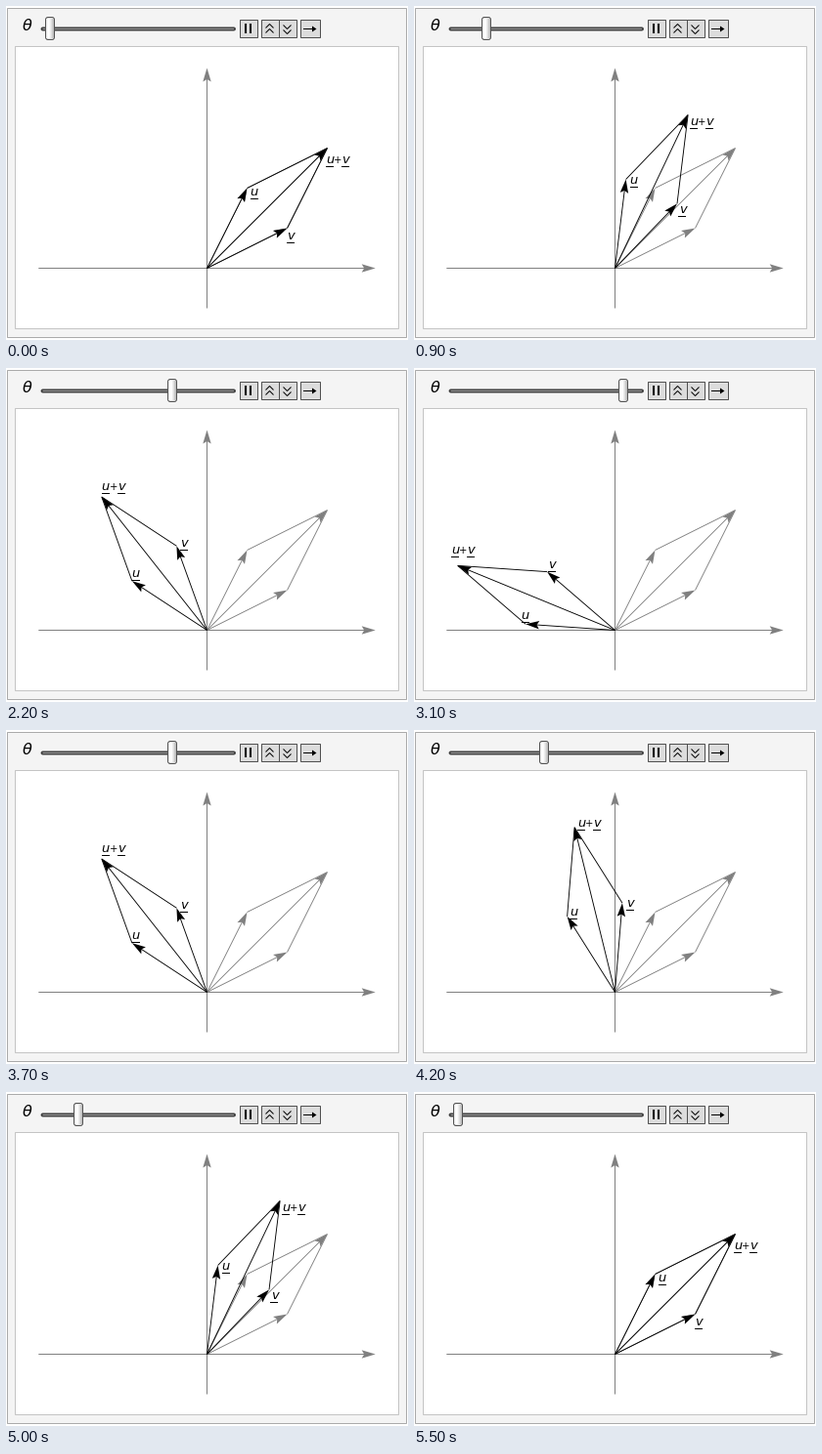
These frames come from a looping animation (411x342 px, 6000 ms). A matplotlib script:

```python
import numpy as np
import matplotlib.pyplot as plt
from matplotlib.animation import FuncAnimation
from matplotlib.patches import FancyBboxPatch, Polygon, Rectangle

# Half-pixel coordinates already give crisp lines; snapping would shift them.
plt.rcParams["path.snap"] = False

W, H, DPI = 411, 342, 64
PX = 72 / DPI                      # points per pixel
ORIGIN = np.array([205.5, 268.5])
UNIT = 41
GRAY = "0.5"
U, V = np.array([1, 2]), np.array([2, 1])
HEAD = np.array([[0, 0], [-14, 4.2], [-11.5, 0], [-14, -4.2]])

fig = plt.figure(figsize=(W / DPI, H / DPI), dpi=DPI, facecolor="white")
ax = fig.add_axes([0, 0, 1, 1])
ax.set(xlim=(0, W), ylim=(H, 0))
ax.axis("off")


def box(x0, y0, x1, y1, fill, edge, radius=0, z=1):
    if radius:
        patch = FancyBboxPatch((x0, y0), x1 - x0, y1 - y0, fc=fill, ec=edge,
                               boxstyle=f"round,pad=0,rounding_size={radius}",
                               lw=PX, zorder=z)
    else:
        patch = Rectangle((x0, y0), x1 - x0, y1 - y0, fc=fill, ec=edge,
                          lw=PX, zorder=z)
    return ax.add_patch(patch)


def line(xs, ys, color="black", width=1.0, z=2, cap="butt"):
    return ax.plot(xs, ys, color=color, lw=width * PX, zorder=z,
                   solid_capstyle=cap, solid_joinstyle="miter")[0]


def glyph(char, size, x=0, y=0):
    return ax.text(x, y, char, fontsize=size * PX, family="DejaVu Sans",
                   style="italic", ha="center", va="baseline", zorder=8)


def stage(p):
    return ORIGIN + UNIT * np.asarray(p) * [1, -1]


def rotate(p, angle):
    c, s = np.cos(angle), np.sin(angle)
    return np.array([c * p[0] - s * p[1], s * p[0] + c * p[1]])


class Arrow:
    def __init__(self, color, z, width=1.0):
        self.shaft = line([], [], color, width, z)
        self.head = ax.add_patch(Polygon(HEAD, fc=color, ec="none", zorder=z))

    def place(self, start, end):
        d = (end - start) / np.hypot(*(end - start))
        stop = end - 8 * d
        self.shaft.set_data([start[0], stop[0]], [start[1], stop[1]])
        self.head.set_xy(end + HEAD @ np.array([d, [-d[1], d[0]]]))


class Parallelogram:
    def __init__(self, color, z):
        self.arrows = [Arrow(color, z, 0.9) for _ in range(3)]
        self.sides = line([], [], color, 0.9, z)

    def place(self, angle):
        tips = [stage(rotate(p, angle)) for p in (U, V, U + V)]
        for arrow, tip in zip(self.arrows, tips):
            arrow.place(ORIGIN, tip)
        u, v, total = tips
        self.sides.set_data(*np.array([u, total, v]).T)
        return tips


class Label:
    """Italic letters beside a tip; all but the plus sign are underlined."""

    def __init__(self, chars, gap):
        self.gap = gap
        self.parts = []
        for i, char in enumerate(chars):
            dx = 8 * (i - (len(chars) - 1) / 2)
            bar = None if char == "+" else line([], [], z=8)
            self.parts.append((dx, glyph(char, 10 if char == "+" else 13), bar))

    def place(self, tip):
        d = (tip - ORIGIN) / np.hypot(*(tip - ORIGIN))
        x, y = tip + self.gap * np.array([-d[1], d[0]]) + [-1, 3.4]
        base = round(y)
        for dx, text, bar in self.parts:
            text.set_position((x + dx, base))
            if bar:
                left = round(x + dx - 4)
                bar.set_data([left, left + 8], [base + 3.5] * 2)


class Knob:
    SHADES = (0.92, 0.97, 1, 0.98, 0.93, 0.87, 0.8, 0.74)

    def __init__(self):
        self.body = box(0, 11.5, 9, 34.5, "0.88", "0.33", 2.5, z=5)
        self.strips = [ax.add_patch(Rectangle((0, 13), 1, 20, fc=str(s),
                                              ec="none", zorder=6))
                       for s in self.SHADES]

    def place(self, x):
        self.body.set_x(x - 4.5)
        for i, strip in enumerate(self.strips):
            strip.set_x(x - 4 + i)


def draw_panel():
    box(1.5, 2.5, 409.5, 339.5, "#f4f4f4", "#aaaaaa", z=0)
    box(9.5, 41.5, 401.5, 330.5, "white", "#c4c4c4", z=0.5)
    glyph("θ", 16, 21.5, 25)
    line([37.5, 233], [23.5, 23.5], "0.25", 4, cap="round")
    line([37.5, 233], [23.5, 23.5], "0.62", 1)


def draw_buttons():
    for x0, x1 in ((239.5, 257.5), (261.5, 297.5), (301.5, 321.5)):
        box(x0, 14.5, x1, 32.5, "#dcdcdc", "#505050")
    line([279.5, 279.5], [14.5, 32.5], "#505050")
    for x in (245, 250):
        line([x, x], [18, 28], width=2)
    for dy in (0, 5):
        line([265.5, 269.5, 273.5], [22.5 + dy, 18.5 + dy, 22.5 + dy])
        line([283.5, 287.5, 291.5], [19.5 + dy, 23.5 + dy, 19.5 + dy])
    line([304, 316], [23.5, 23.5])
    ax.add_patch(Polygon([(317.5, 23.5), (313, 20.5), (313, 26.5)],
                         fc="black", ec="none", zorder=3))


def degrees(tick):
    """Hold at zero, sweep up towards 120, pause for one tick, sweep back."""
    step = min(tick, 59 - tick) - 5
    return 120 * max(step, 0) / 24.5


draw_panel()
draw_buttons()
Arrow(GRAY, 2).place(stage((-4.2, 0)), stage((4.2, 0)))
Arrow(GRAY, 2).place(stage((0, -1)), stage((0, 5)))
Parallelogram(GRAY, 3).place(0)
moving = Parallelogram("black", 4)
labels = [Label("u", 9), Label("v", 9), Label("u+v", 16.6)]
knob = Knob()


def update(tick):
    angle = degrees(tick)
    for label, tip in zip(labels, moving.place(np.radians(angle))):
        label.place(tip)
    knob.place(round(45 + 1.5 * angle))
    return []


anim = FuncAnimation(fig, update, frames=60, interval=100, repeat=True,
                     repeat_delay=0, init_func=lambda: update(0))
plt.show()
```
